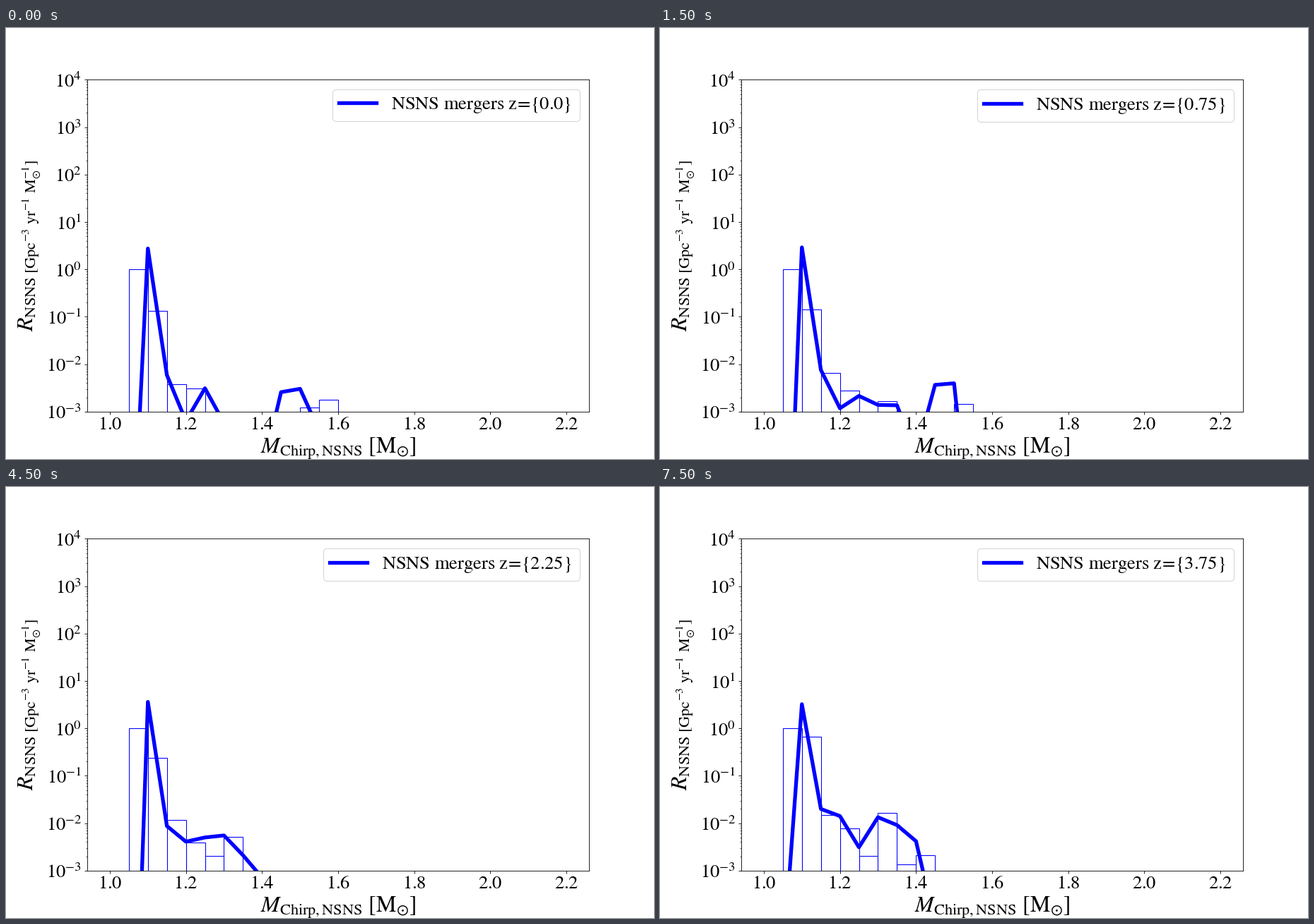
Write a matplotlib script that moves like this. It is 917 px wide and 611 px high and loops after 8000 ms.

```python
import numpy as np
import matplotlib.pyplot as plt
from matplotlib.animation import FuncAnimation
from matplotlib.ticker import FuncFormatter, LogLocator, MultipleLocator, NullFormatter

DPI = 76.4
WIDTH, HEIGHT = 917, 611
STEPS, STEP_MS = 16, 500
BIN = 0.05

plt.rcParams.update({
    "font.family": "Liberation Serif",
    "mathtext.fontset": "stix",
    "font.size": 25,
})

mass = 1.05 + BIN * np.arange(11)


def line_logs(i):
    """log10 of the merger rate at each mass; values under -3 are out of view."""
    turns = [0, 5, 7, 15]
    peak = np.interp(i, turns, [0.44, 0.48, 0.575, 0.51])
    entry = np.interp(i, turns, [1.079, 1.084, 1.09, 1.068])
    return [
        peak - (peak + 3) * BIN / (1.1 - entry),
        peak,
        np.interp(i, turns, [-2.23, -2.05, -2.18, -1.70]),
        -3.2 + 0.09 * i,
        -2.46 - 0.21 * np.cos(2 * np.pi * (i - 3.2) / 15),
        -3.24 + 0.136 * i - 0.003 * i**2,
        np.interp(i, [0, 2, 5, 15], [-4.2, -2.75, -3.1, -2.04]),
        -4.3 + 0.128 * i,
        np.interp(i, [0, 2, 5, 7, 15], [-2.59, -2.43, -2.45, -6, -4.1]),
        np.interp(i, [0, 2, 5, 7], [-2.52, -2.38, -2.45, -6]),
        -3.4 - 0.9 * i,
    ]


def bar_logs(i):
    """log10 of the bar heights, scaled so that the first bar is 1."""
    return [
        0,
        -0.87 + 0.0031 * i**2,
        -1.75 - 0.67 * np.exp(-i / 7),
        np.interp(i, [0, 2, 5, 7, 15], [-2.51, -2.49, -2.68, -2.5, -2.11]),
        -2.58 - 0.0125 * (i - 12)**2,
        -3.02 + 0.082 * i,
        -4.15 + 0.085 * i,
        -4.4 + 0.115 * i,
        -6,
        -2.84 - 0.011 * (i - 2.5)**2,
        -2.75 - 0.15 * i,
    ]


def rm(text):
    return rf"$\mathrm{{{text}}}$"


def label(z):
    return rm(rf"NSNS\ mergers\ z\!=\!\{{{z}\}}")


fig = plt.figure(figsize=((WIDTH + 0.01) / DPI, (HEIGHT + 0.01) / DPI), dpi=DPI)
ax = fig.add_axes([0.125, 0.11, 0.775, 0.77])
ax.set_yscale("log")

bars = ax.bar(mass, np.ones_like(mass), width=BIN, bottom=1e-9, align="edge",
              fill=False, edgecolor="blue", linewidth=1)
line, = ax.plot(mass, np.ones_like(mass), color="blue", linewidth=5, label=label(0.0))

ax.set_xlim(0.94, 2.26)
ax.set_ylim(1e-3, 1e4)
ax.xaxis.set_major_locator(MultipleLocator(0.2))
ax.xaxis.set_major_formatter(FuncFormatter(lambda v, _: rm(f"{v:.1f}")))
ax.yaxis.set_major_locator(LogLocator(numticks=12))
ax.yaxis.set_minor_locator(LogLocator(subs=np.arange(2, 10), numticks=12))
ax.yaxis.set_major_formatter(
    FuncFormatter(lambda v, _: rm(f"10^{{{round(np.log10(v))}}}")))
ax.yaxis.set_minor_formatter(NullFormatter())
ax.tick_params(axis="x", pad=4.4)

ax.set_xlabel(r"$M_{\mathrm{Chirp, NSNS}}\ \mathrm{[M_{\odot}]}$",
              fontsize=30, labelpad=4.5)
ax.set_ylabel(r"$R_{\mathrm{NSNS\ [Gpc^{-3}\ yr^{-1}\ M_{\odot}^{-1}]}}$", fontsize=30)

legend = ax.legend(loc="upper right", borderpad=0.35, handletextpad=0.89)
legend_text = legend.get_texts()[0]
legend_text.set_x(-3)


def update(i):
    line.set_ydata(np.power(10.0, line_logs(i)))
    for bar, height in zip(bars, np.power(10.0, bar_logs(i))):
        bar.set_height(height)
    legend_text.set_text(label(i * 0.25))
    return [line, legend_text, *bars]


anim = FuncAnimation(fig, update, frames=STEPS, interval=STEP_MS,
                     repeat=True, repeat_delay=0, blit=False)
plt.show()
```
